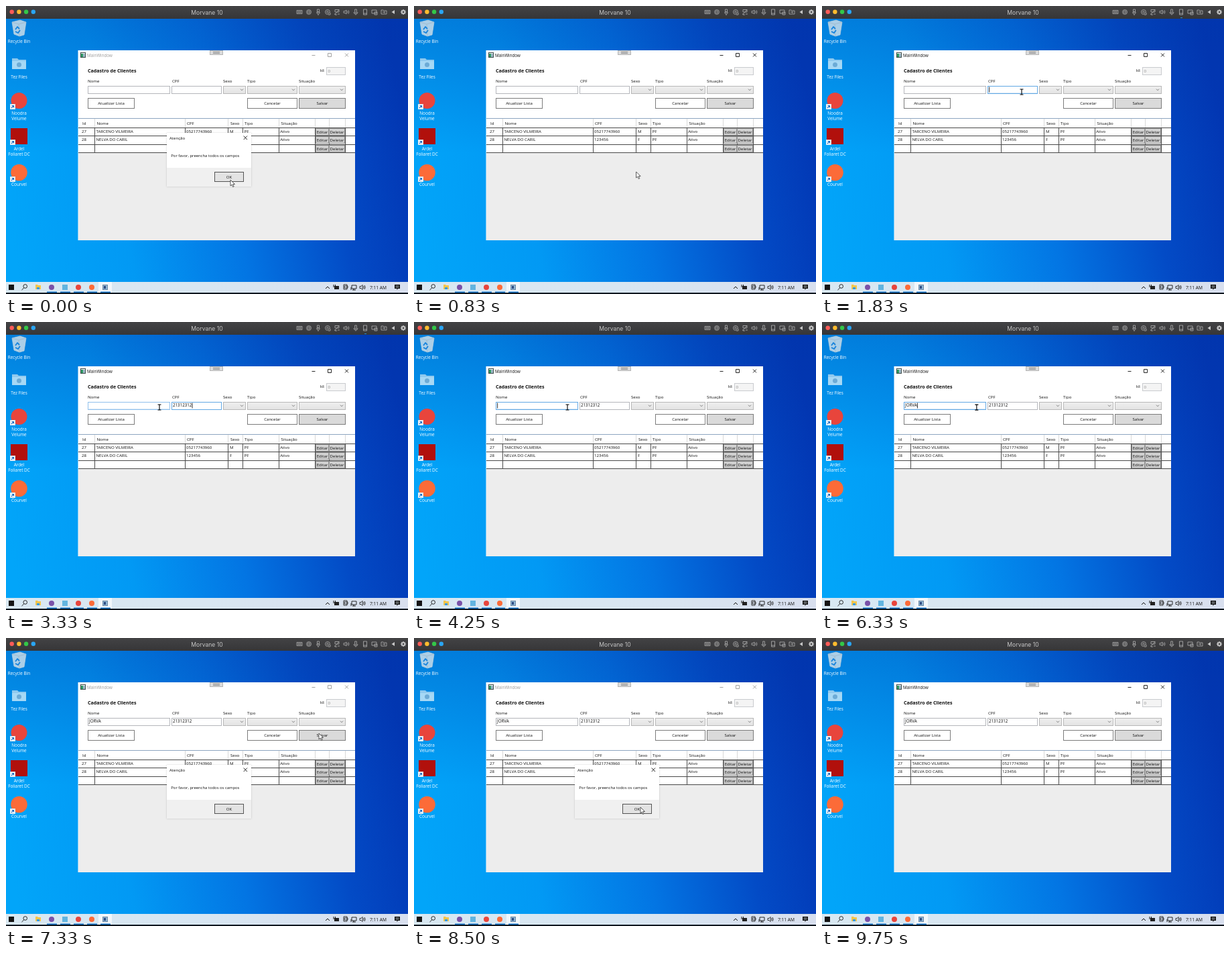
Animation of 600 by 429 pixels, one loop 9.83 s. Source, as an HTML page with a canvas:

```html
<!DOCTYPE html>
<html lang="pt">
<head>
<meta charset="utf-8">
<style>
  html, body { margin: 0; width: 100%; height: 100%; overflow: hidden; background: #000; }
  canvas { display: block; }
</style>
</head>
<body>
<canvas id="stage" width="600" height="429"></canvas>
<script>
const c = document.getElementById('stage').getContext('2d');
const LOOP = 9830;
const INK = '#111', BLUE = '#62a8e4', EDGE = '#7c7c7c', RULE = '#4a4a4a';

// Timeline
const cpfKeys = [2080, 2200, 2330, 2450, 2580, 2700, 2830, 2950];
const nameKeys = [4600, 5300, 5550, 5800, 6050];
const mousePath = [
  [0, 335, 259], [700, 335, 259], [1400, 298, 128], [3050, 298, 128], [3330, 229, 127],
  [6300, 229, 127], [6900, 467, 142], [7500, 467, 142], [8350, 338, 252], [LOOP, 338, 252]
];
const within = (t, a, b) => t >= a && t < b;

function text(s, x, y, { size = 6.1, color = INK, align = 'left', weight = 400, family = '"Open Sans"' } = {}) {
  c.font = `${weight} ${size}px ${family}, "DejaVu Sans", sans-serif`;
  c.fillStyle = color;
  c.textAlign = align;
  c.fillText(s, x, y);
}

function rect(x, y, w, h, fill) {
  c.fillStyle = fill;
  c.fillRect(x, y, w, h);
}

function box(x, y, w, h, fill, stroke) {
  rect(x, y, w, h, fill);
  c.strokeStyle = stroke;
  c.lineWidth = 1;
  c.strokeRect(x + .5, y + .5, w - 1, h - 1);
}

function disc(x, y, r, fill) {
  c.fillStyle = fill;
  c.beginPath();
  c.arc(x, y, r, 0, 7);
  c.fill();
}

function path(d, stroke, width = 1, fill, x = 0, y = 0) {
  const p = new Path2D(d);
  c.save();
  c.translate(x, y);
  if (fill) { c.fillStyle = fill; c.fill(p); }
  if (stroke) { c.strokeStyle = stroke; c.lineWidth = width; c.stroke(p); }
  c.restore();
}

function button(label, x, y, w, h, fill = '#fff', edge = EDGE) {
  box(x, y, w, h, fill, edge);
  text(label, x + w / 2, y + h / 2 + 2.1, { align: 'center' });
}

function gradient(x0, y0, x1, y1, ...stops) {
  const g = c.createLinearGradient(x0, y0, x1, y1);
  stops.forEach(([at, color]) => g.addColorStop(at, color));
  return g;
}

function drawTopBar(t) {
  rect(0, 0, 600, 19, gradient(0, 0, 0, 19, [0, '#434345'], [1, '#363638']));
  ['#fc5b57', '#fdbc2e', '#33c748', '#2aa5f3'].forEach((color, i) => disc(8.7 + 10.7 * i, 8.8, 3.2, color));
  text('Morvane 10', 300, 12.5, { size: 8.6, color: '#c6c6c6', align: 'center', family: 'Inter' });
  if (within(t, 2150, 3050) || within(t, 4650, 6250))
    text('Ctrl(^)+Alt(⌥) to free cursor', 56.5, 11.3, { size: 6.6, color: '#bcbcbc', family: 'Inter' });

  const icons = [
    'M-4 -2.5H4V2.5H-4ZM-3 -.8H3M-3 .8H3',
    'M3.5 0A3.5 3.5 0 1 1 -3.5 0A3.5 3.5 0 1 1 3.5 0M-1.5 -1.5H1.5V1.5H-1.5Z',
    'M-1.5 -4H1.5V0H-1.5ZM-2 0H2V2L0 3L-2 2ZM0 3V5',
    'M3.5 0A3.5 3.5 0 1 0 0 3.5M1.3 0A1.3 1.3 0 1 0 0 1.3M1 1H4V4H1Z',
    'M-3 -3.5H3V0H-3ZM-3 3.5L3 -3.5M-3 2V4H0M1 3H4',
    'M-4 -1.3H-2L0 -3V3L-2 1.3H-4ZM1.5 -1.5Q2.5 0 1.5 1.5M3 -2.7Q5 0 3 2.7',
    'M-1.3 -4H1.3V1H-1.3ZM-3 0Q-3 3 0 3T3 0M0 3V4.5',
    'M-2.5 -4H2.5V4H-2.5ZM-2.5 2H2.5',
    'M-4 -3H3V2H-4ZM0 0H4V4H0Z',
    'M-4 -3H-1L0 -2H4V3H-4ZM-2 0H1M1 -1V2'
  ];
  icons.forEach((d, i) => path(d, '#b2b2b2', .8, null, 438 + 14 * i, 9));
  path('M2 -3L-2.5 0L2 3Z', null, 0, '#c8c8c8', 578, 9);
  for (let i = 0; i < 4; i++) {
    const a = i * Math.PI / 4, dx = 4 * Math.cos(a), dy = 4 * Math.sin(a);
    path(`M${-dx} ${-dy}L${dx} ${dy}`, '#c8c8c8', 1.5, null, 593, 9);
  }
  disc(593, 9, 2.8, '#c8c8c8');
  disc(593, 9, 1.2, '#3b3b3d');
  if (within(t, 1000, 4000)) rect(535, 17, 3, 1, '#2a86c8');
}

function drawDesktop() {
  rect(0, 19, 600, 393, gradient(0, 310, 600, 190,
    [0, '#02a5f9'], [.28, '#0299f4'], [.55, '#0375e3'], [.8, '#034bc6'], [1, '#0237b4']));
  rect(0, 19, 600, 200, gradient(0, 19, 0, 219, [0, 'rgba(0,50,160,.3)'], [1, 'rgba(0,50,160,0)']));

  const label = (s, y) => text(s, 19.5, y, { size: 6.4, color: '#fff', align: 'center' });
  const shortcut = y => {
    box(6, y, 8, 8, '#fff', '#dce6ef');
    path('M8 6L11.5 2.5M8.5 2.5H11.5V5.5', '#1467c0', 1.1, null, 0, y);
  };
  path('M9 24L21 21L30 24L27 43L20 45L12 42Z', '#c3d4de', .7, 'rgba(214,226,234,.8)');
  path('M9 24L19 27L30 24M19 27L20 45', '#9cb4c4', .7);
  path('M14 35L17 31L20 34M21 36L18 40L14 38', '#1683dd', 1.8);
  label('Recycle Bin', 54.5);

  path('M9 81V78H17L19 80H30V94H9Z', null, 0, '#8fc9ee');
  rect(9, 82, 21, 12, '#a6d8f5');
  disc(19.5, 87.5, 3.5, '#6cabd6');
  label('Tez Files', 107.5);

  disc(19.5, 141, 12, '#e8453c');
  shortcut(146);
  label('Noodra', 161.5);
  label('Velume', 169.5);

  rect(7, 182, 25, 24, '#b1100c');
  shortcut(199);
  label('Ardel', 214.5);
  label('Foliaret DC', 222.5);

  disc(19.5, 248, 12.3, '#fc6b38');
  shortcut(254);
  label('Courvel', 268);
}

function drawTaskbar() {
  rect(0, 411, 600, 18, '#101820');
  rect(0, 411, 600, 16, gradient(0, 0, 600, 0, [0, '#d8e8f2'], [.5, '#d8e6f2'], [1, '#d8dfee']));
  rect(138, 411, 20, 16, '#f2f7fb');
  rect(4, 415, 8, 8, '#151515');
  path('M31.5 417.5A2.8 2.8 0 1 1 25.9 417.5A2.8 2.8 0 1 1 31.5 417.5M26.8 419.8L23.5 423', '#222', 1);
  path('M44 415H47L48 416H52V422H44Z', null, 0, '#f4c64b');
  rect(46, 419, 4, 3, '#3b9be0');
  disc(68, 419, 4, '#7a52a8');
  rect(84, 415, 8, 8, '#62b4df');
  disc(108, 419, 4, '#e8453c');
  disc(128, 419, 4, '#fc6b38');
  box(144, 415, 8, 8, '#8fb7d6', '#6f8aa5');
  rect(146, 417, 3, 4, '#2d4a80');
  for (let x = 61; x < 150; x += 20) rect(x, 425.5, 15, 1.5, '#0a6fc9');

  path('M477 421L480 418L483 421', INK, 1);
  box(490, 417, 7, 5, '#222', '#222');
  path('M489 415V419M491.5 415V418', INK, 1);
  path('M504 415H509V422H504ZM505 417H510V420H505Z', '#222', .9);
  path('M516 416H523V421H516ZM519 421V423M517 423H522M515 419V423', INK, .9);
  path('M528 417.5H530L532 415.5V422.5L530 420.5H528ZM533.5 417Q535 419 533.5 421M535 416Q537.5 419 535 422', '#222', .9);
  text('7:11 AM', 555.5, 421.5, { size: 6.6, align: 'center' });
  path('M580 415H588V421H585L583.5 423V421H580Z', null, 0, INK);
  path('M581.5 417H586.5M581.5 419H586.5', '#dfe7f0', .7);
}

function input(x, w, value, { focus, hover, caret }) {
  box(x, 119, w, 12, '#fff', focus ? BLUE : hover ? '#8fc0ec' : '#b4b6bb');
  if (hover) {
    c.setLineDash([1, 1]);
    path(`M${x + 2} 129.5H${x + w - 2}`, '#7fb4e4', .6);
    c.setLineDash([]);
  }
  text(value, x + 2, 126, { size: 6.2 });
  if (caret) rect(x + 2.3 + c.measureText(value).width, 120.5, .8, 8, '#000');
}

function select(x, w) {
  box(x, 119, w, 12, gradient(0, 119, 0, 131, [0, '#efefef'], [1, '#e3e3e3']), '#b8b8b8');
  path('M-2 -1L0 1L2 -1', '#707070', .9, null, x + w - 6, 124.7);
}

function drawGrid() {
  rect(108, 167, 413, 182, '#ededed');
  rect(108, 168, 413, 51, '#fff');
  rect(108, 167, 413, 1, '#8ea6c0');
  const columns = [132, 267, 331, 353, 407, 461, 482, 506];
  columns.forEach(x => {
    rect(x, 168, 1, 13, '#d8d8d8');
    rect(x, 181, 1, 38, RULE);
  });
  [181, 193, 206, 218].forEach(y => rect(108, y, 413, 1, RULE));

  const headings = ['Id', 'Nome', 'CPF', 'Sexo', 'Tipo', 'Situação'];
  [114, 135.5, 270, 335, 356, 410.5].forEach((x, i) => text(headings[i], x, 177.4));
  const rows = [
    ['27', 'TARCENO VILMEIRA', '05217743960', 'M', 'PF', 'Ativo'],
    ['28', 'NELVA DO CARIL', '123456', 'F', 'PF', 'Ativo']
  ];
  rows.forEach((row, r) =>
    [113, 134.5, 269, 334, 355.5, 409].forEach((x, i) => text(row[i], x, 188.6 + 12.3 * r)));
  [182, 194, 207].forEach(y => {
    button('Editar', 462, y, 20, 11, '#d0d0d0', '#959595');
    button('Deletar', 482, y, 24, 11, '#d0d0d0', '#959595');
  });
}

function drawWindow(t, dialog, mouse) {
  rect(107.5, 66, 413.5, 283, '#fff');

  const chrome = dialog ? '#999' : INK;
  box(111, 69, 8, 8, '#fff', '#3c4a48');
  rect(112, 71, 3, 5, '#2f9a62');
  rect(115, 71, 3, 5, '#9db9c9');
  text('MainWindow', 121, 75.6, { size: 6.2, color: chrome });
  path('M456.5 73.5H461.5M480.5 70.5H485.5V75.5H480.5ZM506 70.5L511 75.5M511 70.5L506 75.5', chrome, .9);
  box(304, 66, 20, 7, '#dcdcdc', '#b5b5b5');
  path('M309 68.5H319M309 70.5H319', '#777', .8);

  text('Cadastro de Clientes', 122, 99, { size: 7.1, weight: 700 });
  text('Id:', 468.5, 98.2);
  box(478, 91, 29, 12, '#f4f4f4', '#c9cbcf');
  text('0', 480.5, 98.6, { color: '#8a8a8a' });
  const labels = ['Nome', 'CPF', 'Sexo', 'Tipo', 'Situação'];
  [122, 248, 324, 360, 437].forEach((x, i) => text(labels[i], x, 114.2));

  const cpfFocus = within(t, 1450, 4000);
  const nameFocus = within(t, 4000, 7050);
  const typed = keys => keys.filter(k => k <= t).length;
  const lastEvent = Math.max(...[0, 1450, 4000, ...cpfKeys, ...nameKeys].filter(k => k <= t));
  const blink = (t - lastEvent) % 1060 < 530;
  const hover = (x, w) => !dialog && mouse.shown && within(mouse.x, x, x + w) && within(mouse.y, 119, 131);
  input(122, 123, 'JORVA'.slice(0, typed(nameKeys)),
    { focus: nameFocus, hover: hover(122, 123), caret: nameFocus && blink });
  input(247, 75, '21312312'.slice(0, typed(cpfKeys)),
    { focus: cpfFocus, hover: hover(247, 75), caret: cpfFocus && blink });
  select(324, 34);
  select(360, 75);
  select(437, 70);

  button('Atualizar Lista', 122, 137, 70, 16);
  button('Cancelar', 360, 137, 75, 16);
  const overSave = !dialog && mouse.shown && within(mouse.x, 437, 507) && within(mouse.y, 137, 153);
  button('Salvar', 437, 137, 70, 16, overSave ? '#bee6fd' : '#dadada', overSave ? BLUE : EDGE);
  drawGrid();
}

function drawDialog() {
  c.save();
  c.shadowColor = 'rgba(0,0,0,.2)';
  c.shadowBlur = 2;
  rect(240, 189, 126, 80, '#fff');
  c.restore();
  rect(240, 241, 126, 28, '#f0f0f0');
  text('Atenção', 244, 198.8);
  path('M354.7 193.5L360 199M360 193.5L354.7 199', INK, .9);
  text('Por favor, preencha todos os campos', 246.3, 225.3, { size: 5.9 });
  button('OK', 311, 247, 44, 15, '#e3e3e3', '#555');
}

function mouseAt(t) {
  const i = mousePath.findIndex(p => p[0] > t);
  const [t0, x0, y0] = mousePath[i - 1], [t1, x1, y1] = mousePath[i];
  const u = (t - t0) / (t1 - t0), e = u * u * (3 - 2 * u);
  const shown = !within(t, 2080, 3050) && !within(t, 4550, 6300) && t < 9300;
  return { x: x0 + (x1 - x0) * e, y: y0 + (y1 - y0) * e, shown };
}

function drawMouse({ x, y, shown }, dialog) {
  if (!shown) return;
  const overText = !dialog && within(y, 119, 131) && within(x, 122, 322);
  if (overText) path('M-2.5 -4H2.5M0 -4V4M-2.5 4H2.5', '#000', 1.1, null, x, y);
  else path('M0 0V9L2.1 7L3.6 10.5L5.2 9.8L3.7 6.5H6.5Z', '#333', .8, '#fff', x, y);
}

function frame(now) {
  const t = now % LOOP;
  const dialog = t < 650 || within(t, 7050, 9250);
  const mouse = mouseAt(t);
  drawDesktop();
  drawTopBar(t);
  drawTaskbar();
  drawWindow(t, dialog, mouse);
  if (dialog) drawDialog();
  drawMouse(mouse, dialog);
}

const start = performance.now();
(function tick() {
  frame(performance.now() - start);
  requestAnimationFrame(tick);
})();
</script>
</body>
</html>
```
